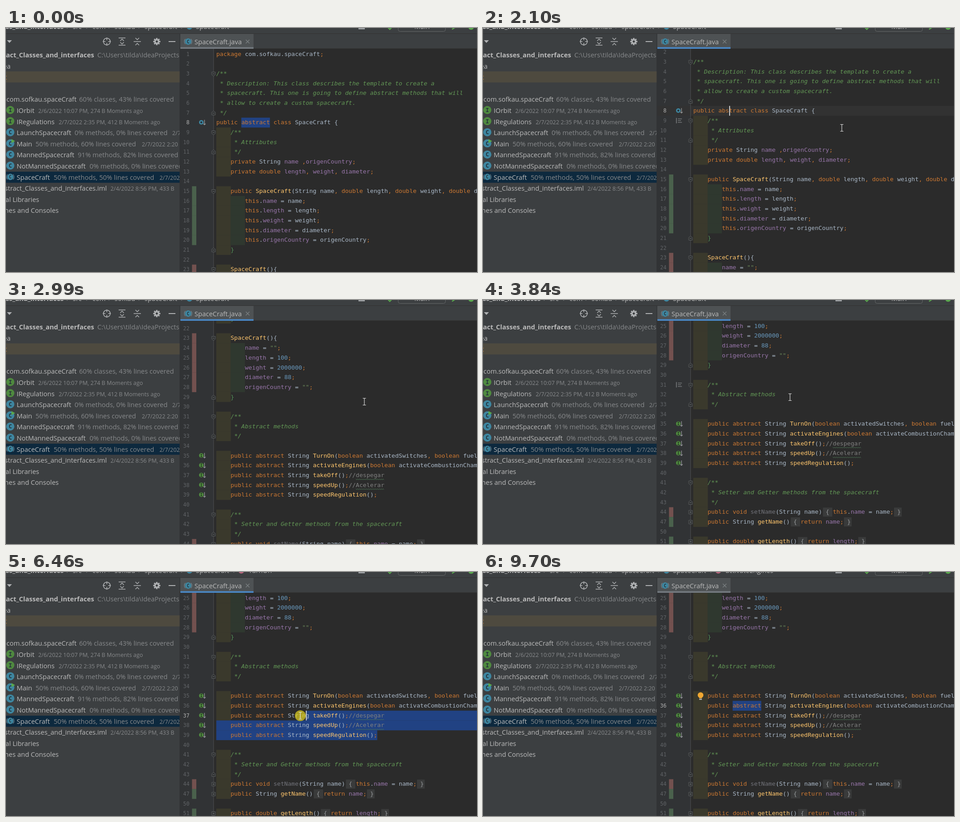
These frames come from a looping animation (1037x540 px, 9760 ms). An HTML page with a canvas:

```html
<!DOCTYPE html>
<html lang="en">
<head>
<meta charset="utf-8">
<title>SpaceCraft.java</title>
<style>
html, body { margin: 0; width: 100%; height: 100%; overflow: hidden; background: #2b2b2b; }
canvas { display: block; width: 1037px; height: 540px; }
</style>
</head>
<body>
<canvas id="stage"></canvas>
<script>
const W = 1037, H = 540, LOOP = 9760;
const CW = 7.875, LH = 21.68, X0 = 463, Y0 = 57.5, TOP = 46;
const MONO = '"DejaVu Sans Mono", monospace';
const SANS = '"Open Sans", "Noto Sans", sans-serif';
const TEXT = '#bbbbbb', DIM = '#87898b', CODE = '#a9b7c6', KEY = '#cc7832', SELECTED = '#214283';

const canvas = document.getElementById('stage');
const dpr = window.devicePixelRatio || 1;
canvas.width = Math.round(W * dpr);
canvas.height = Math.round(H * dpr);
const g = canvas.getContext('2d');
g.scale(dpr, dpr);

const source = `package com.sofkau.spaceCraft;

/**
 * Description: This class describes the template to create a
 * spacecraft. This one is going to define abstract methods that will
 * allow to create a custom spacecraft.
 */
public abstract class SpaceCraft {
    /**
     * Attributes
     */
    private String name ,origenCountry;
    private double length, weight, diameter;

    public SpaceCraft(String name, double length, double weight, double diameter) {
        this.name = name;
        this.length = length;
        this.weight = weight;
        this.diameter = diameter;
        this.origenCountry = origenCountry;
    }

    SpaceCraft(){
        name = "";
        length = 100;
        weight = 2000000;
        diameter = 88;
        origenCountry = "";
    }

    /**
     * Abstract methods
     */

    public abstract String TurnOn(boolean activatedSwitches, boolean fuelTank);
    public abstract String activateEngines(boolean activateCombustionChamber);
    public abstract String takeOff();//despegar
    public abstract String speedUp();//Acelerar
    public abstract String speedRegulation();

    /**
     * Setter and Getter methods from the spacecraft
     */
    public void setName(String name) { this.name = name; }
    public String getName() { return name; }

    public double getLength() { return length; }`;

const TOKEN = /\/\/.*|"[^"]*"|\d+|\w+|[;,]|[^\s\w;,"]+?/g;
const KEYWORD = /^(package|public|abstract|class|private|double|boolean|void|this|return)$/;
const FIELD = /^(name|length|weight|diameter|origenCountry)$/;

function tokenColor(word, before, after, folded) {
  if (word.startsWith('//')) return '#808080';
  if (word[0] === '"') return '#6a8759';
  if (/^\d/.test(word)) return '#6897bb';
  if (/[;,]/.test(word) || KEYWORD.test(word)) return KEY;
  if (FIELD.test(word) && /(this\.|return |private .*|^ +)$/.test(before)) return '#9876aa';
  if (word === 'setName') return '#72737a';
  if (/\w/.test(word) && after[0] === '(') return '#ffc66d';
  if (word === '}' && !before.trim()) return '#549159';
  if (folded && /[{}]/.test(word)) return '#96999b';
  return CODE;
}

const lines = source.split('\n').map((text, i) => {
  const no = i < 44 ? i + 1 : [47, 50, 51][i - 44];
  const doc = /^\s*(\/\*\*|\*)/.test(text);
  const folded = text.includes(' { ');
  const tokens = doc
    ? [{ s: text.trimStart(), col: text.search(/\S/), color: '#629755' }]
    : [...text.matchAll(TOKEN)].map(m => ({
        s: m[0], col: m.index,
        color: tokenColor(m[0], text.slice(0, m.index), text.slice(m.index + m[0].length), folded)
      }));
  let fold = '';
  if (folded) fold = 'plus';
  else if (/\/\*\*$|\).*\{$/.test(text)) fold = 'open';
  else if (/^\s*(\*\/|\})$/.test(text)) fold = 'close';
  const cover = (no > 14 && no < 21) || no === 47 || no === 51 ? '#4a614c'
    : (no > 22 && no < 29) || no === 44 ? '#73514f' : '';
  return { no, text, doc, folded, tokens, fold, cover, indent: text.search(/\S/) };
});

// Motion: [time, value...]
const scrollKeys = [[0, 0], [2030, 0], [2100, 26], [2160, 26], [2230, 80], [2300, 155], [2370, 225],
  [2440, 260], [2600, 260], [2640, 273], [2700, 273], [2840, 375], [3000, 455], [3200, 520.3]];
const mouseKeys = [[70, 760, 505], [250, 700, 400], [640, 541, 212], [800, 541, 212], [1000, 600, 226],
  [1340, 600, 226], [1950, 790, 221], [2300, 790, 221], [2640, 789, 225], [3100, 789, 225],
  [3560, 600, 218], [3700, 674, 218], [3840, 676, 215], [3920, 676, 215], [4300, 612, 221],
  [4710, 640, 216], [4840, 640, 216], [5300, 612, 226], [5780, 800, 370], [5980, 821, 366],
  [6180, 821, 366], [6400, 690, 322], [6460, 648, 318], [6520, 648, 318], [7000, 520, 288],
  [7290, 484, 274], [7510, 484, 274], [7780, 584, 272], [7980, 584, 272], [8360, 598, 298],
  [8810, 598, 298], [9400, 972, 534], [9480, 990, 570]];
const presses = [[680, 820], [6180, 7300], [7800, 7960], [8380, 8460], [8530, 8620]];

function at(keys, t) {
  const i = keys.findIndex(k => k[0] > t);
  if (i < 0) return keys[keys.length - 1].slice(1);
  if (i === 0) return keys[0].slice(1);
  const a = keys[i - 1], b = keys[i], p = (t - a[0]) / (b[0] - a[0]);
  return a.slice(1).map((v, j) => v + (b[j + 1] - v) * p);
}
const within = (t, a, b) => t >= a && t < b;

function rect(x, y, w, h, color) { g.fillStyle = color; g.fillRect(x, y, w, h); }
function text(s, x, y, color, font, align = 'left') {
  g.font = font; g.fillStyle = color; g.textAlign = align; g.fillText(s, x, Math.round(y));
}
function circle(x, y, r, color) {
  g.fillStyle = color; g.beginPath(); g.arc(x, y, r, 0, 7); g.fill();
}
function path(points, color, width = 1, fill = false) {
  g.beginPath();
  points.forEach(([x, y], i) => i ? g.lineTo(x, y) : g.moveTo(x, y));
  if (fill) { g.closePath(); g.fillStyle = color; g.fill(); }
  else { g.strokeStyle = color; g.lineWidth = width; g.stroke(); }
}
function clip(x, y, w, h, draw) {
  g.save(); g.beginPath(); g.rect(x, y, w, h); g.clip(); draw(); g.restore();
}
const sans = (size = 14.55, weight = '') => `${weight} ${size}px ${SANS}`;

function badge(x, y, letter, r = 9) {
  circle(x, y, r, letter === 'I' ? '#4f8a3f' : '#3e86a0');
  text(letter, x, y + r * 0.5, '#25323a', `bold ${r * 1.4}px ${MONO}`, 'center');
}
function abstractBadge(x, y) {
  badge(x, y, 'C', 7);
  for (const side of [0, Math.PI]) {
    g.beginPath();
    g.arc(x, y, 8.4, side - 0.75, side + 0.75);
    g.strokeStyle = '#73858f'; g.lineWidth = 1.2; g.stroke();
  }
}

const NORMAL = sans(), SMALL = sans(12.45);
const tree = [
  { end: 194, name: 'Abstract_Classes_and_interfaces', font: sans(14.55, 'bold'), more: [201, 'C:\\Users\\tilda\\IdeaProjects'] },
  { end: 10, name: '.idea' },
  { end: 2, name: 'out', color: '#c9803a' },
  null,
  { x: 1, name: 'com.sofkau.spaceCraft', more: [161, '60% classes, 43% lines covered'] },
  { icon: 'I', name: 'IOrbit', date: [71, '2/6/2022 10:07 PM, 274 B Moments ago'] },
  { icon: 'I', name: 'IRegulations', date: [116, '2/7/2022 2:35 PM, 412 B Moments ago'] },
  { icon: 'C', name: 'LaunchSpacecraft', more: [151, '0% methods, 0% lines covered'], date: [366, '2/7/2022'] },
  { icon: 'C', name: 'Main', run: true, more: [65, '50% methods, 60% lines covered'], date: [299, '2/7/2022 2:20 PM'] },
  { icon: 'C', name: 'MannedSpacecraft', more: [158, '91% methods, 82% lines covered'] },
  { icon: 'C', name: 'NotMannedSpacecraft', more: [184, '0% methods, 0% lines covered'] },
  { icon: 'A', name: 'SpaceCraft', more: [105, '50% methods, 50% lines covered'], date: [338, '2/7/2022'] },
  { end: 222, name: 'Abstract_Classes_and_interfaces.iml', date: [230, '2/4/2022 8:56 PM, 433 B'] },
  { end: 73, name: 'External Libraries' },
  { end: 116, name: 'Scratches and Consoles' }
];

function drawTree() {
  rect(0, 0, 383, H, '#3c3f41');
  rect(0, 96, 383, 24.5, '#4e4a3f');
  rect(0, 318, 383, 24.5, '#0d293e');
  tree.forEach((row, i) => {
    if (!row) return;
    const y = 60 + 24.6 * i, base = y + 5;
    if (row.icon === 'A') abstractBadge(9.5, y - 1);
    else if (row.icon) badge(9.5, y - 1.5, row.icon);
    if (row.run) path([[12, y - 11], [20, y - 6.5], [12, y - 2]], '#59a84d', 1, true);
    const x = row.end || row.x || 23.5;
    text(row.name, x, base, row.color || TEXT, row.font || NORMAL, row.end ? 'right' : 'left');
    if (row.more) text(row.more[1], row.more[0], base, DIM, NORMAL);
    if (row.date) text(row.date[1], row.date[0], base, DIM, SMALL);
  });
  drawTools();
}

function drawTools() {
  const c = '#afb1b3', y = 30;
  path([[2, 27], [13, 27], [7.5, 33]], c, 1, true);
  g.strokeStyle = c; g.lineWidth = 1.5;
  g.beginPath(); g.arc(222, y, 7.6, 0, 7); g.stroke();
  for (const [dx, dy] of [[1, 0], [-1, 0], [0, 1], [0, -1]])
    path([[222 + dx * 3, y + dy * 3], [222 + dx * 9, y + dy * 9]], c, 1.6);
  path([[248, 22], [263, 22]], c, 1.6);
  path([[248, 38], [263, 38]], c, 1.6);
  path([[251.5, 28.5], [255.5, 24.5], [259.5, 28.5]], c, 1.5);
  path([[251.5, 31.5], [255.5, 35.5], [259.5, 31.5]], c, 1.5);
  path([[281, 30], [297, 30]], c, 1.6);
  path([[285, 22], [289, 26], [293, 22]], c, 1.5);
  path([[285, 38], [289, 34], [293, 38]], c, 1.5);
  for (let k = 0; k < 8; k++) {
    const a = k * Math.PI / 4, dx = Math.cos(a), dy = Math.sin(a);
    path([[332 + dx * 4, y + dy * 4], [332 + dx * 8, y + dy * 8]], c, 3.2);
  }
  circle(332, y, 5.8, c);
  circle(332, y, 2.4, '#3c3f41');
  rect(358, 29, 15, 2, c);
}

function drawHeader(t, focused) {
  rect(0, 0, W, 13, '#3c3f41');
  rect(0, 12, W, 1, '#323232');
  const base = 2;
  text('Abstract_Classes_and_interfaces', 127, base, TEXT, sans(14.55, 'bold'), 'right');
  [['src', 147], ['com', 190], ['sofkau', 239], ['spaceCraft', 305], ['SpaceCraft', 418]]
    .forEach(([s, x]) => text(s, x, base, TEXT, NORMAL));
  for (const x of [136, 179, 228, 294, 388]) path([[x - 2, 1], [x + 2, -3]], '#8a8d8f', 1.2);
  circle(404, -3, 6.5, '#3e86a0');
  const method = t < 6200 ? '' : t < 8900 ? 'TurnOn' : 'activateEngines';
  if (method) {
    path([[501, 1], [505, -3]], '#8a8d8f', 1.2);
    circle(518, -3, 6.5, '#b5677d');
    text(method, 534, base, TEXT, NORMAL);
  }
  rect(776, 0, 14, 3, '#9a9da0');
  path([[841, -1], [845, 3], [849, -1]], '#59a84d', 2.4);
  g.strokeStyle = '#646768'; g.lineWidth = 1;
  g.beginPath(); g.roundRect(863.5, -15, 104, 22.5, 4); g.stroke();
  text('Main', 899, base, TEXT, NORMAL);
  path([[982, 3], [990, -2]], '#59a84d', 2.4);
  circle(1024, -2, 6, '#59a84d');

  rect(383, 13, W - 383, 33, '#3c3f41');
  rect(383, 45, W - 383, 1, '#323232');
  rect(384, 13, 161, 33, '#4e5254');
  rect(384, 42.5, 161, 3.5, focused ? '#4a88c7' : '#747a80');
  abstractBadge(401, 30);
  text('SpaceCraft.java', 415, 36, TEXT, NORMAL);
  path([[528, 26], [536, 34]], '#7c8082', 1.2);
  path([[536, 26], [528, 34]], '#7c8082', 1.2);
}

function foldMark(kind, y) {
  const x = 457, s = 4;
  const shape = kind === 'open' ? [[-s, -s], [s, -s], [s, 2], [0, s + 1], [-s, 2], [-s, -s]]
    : kind === 'close' ? [[-s, s], [s, s], [s, -2], [0, -s - 1], [-s, -2], [-s, s]]
    : [[-s, -s], [s, -s], [s, s], [-s, s], [-s, -s]];
  const points = shape.map(([a, b]) => [x + a, y + b]);
  path(points, '#2e3031', 1, true);
  path(points, '#5a5d5f');
  path([[x - 2, y], [x + 2, y]], '#6c6f71');
  if (kind === 'plus') path([[x, y - 2], [x, y + 2]], '#6c6f71');
}

function overrideMark(y, green) {
  const x = 430, c = green ? '#4f8a3f' : '#3e86a0';
  circle(x, y - 0.5, 5, c);
  if (green) text('I', x, y + 3, '#22301f', `bold 8.5px ${MONO}`, 'center');
  else circle(x, y - 0.5, 2.2, '#28333a');
  path([[437, y - 6], [437, y + 5]], '#a0a3a5', 1.2);
  path([[434.5, y + 2.5], [437, y + 5], [439.5, y + 2.5]], '#a0a3a5', 1.2);
}

function authorMark(y) {
  rect(425, y - 6, 1.5, 12, '#7c7f81');
  [-4.5, -0.7, 3.2].forEach((dy, i) => rect(429, y + dy, i === 1 ? 7 : 9, 1.3, '#7c7f81'));
}

// Caret and selection as zero-based row and column
function editState(t, mouse) {
  const anchor = { row: 38, col: 45 };
  if (t < 700) return { row: 7, sel: [{ row: 7, col: 7 }, { row: 7, col: 15 }] };
  if (t < 6180) return { row: 7, col: 10 };
  if (t < 7970) {
    const [x, y] = t < 7300 ? mouse : [484, 274];
    const row = Math.max(34, Math.min(38, Math.round((y + 520.3 - Y0) / LH)));
    const col = Math.max(4, Math.round((x + 12 - X0) / CW));
    const head = { row, col: row === 38 ? Math.min(col, 45) : col };
    return { row, col: t > 7780 ? 15 : head.col, sel: [head, anchor], solid: true };
  }
  if (t < 8390) return { row: 34, col: 15 };
  if (t < 8530) return { row: 35, col: 17 };
  return { row: 35, col: t < 9570 ? 19 : undefined, sel: [{ row: 35, col: 11 }, { row: 35, col: 19 }] };
}

function drawSelection([a, b], rowY) {
  for (let r = a.row; r <= b.row; r++) {
    const x = r === a.row ? X0 + a.col * CW : X0;
    const end = r === b.row ? X0 + b.col * CW : W;
    rect(x, rowY(r) - LH / 2, end - x, LH + 0.2, SELECTED);
  }
}

function wave(col, n, y) {
  const points = [];
  for (let x = 0; x <= n * CW; x += 2) points.push([X0 + col * CW + x, y + (x % 4 ? 1.2 : -1.2)]);
  path(points, '#4d7355', 0.9);
}

function drawEditor(t, scroll, edit) {
  const rowY = r => Y0 + r * LH - scroll;
  rect(383, TOP, 74, H, '#313335');
  rect(457, TOP, W, H, '#2b2b2b');
  if (!edit.sel) rect(383, rowY(edit.row) - LH / 2, W, LH, '#323232');
  rect(456.5, TOP, 1, H, '#505254');

  lines.forEach((line, r) => {
    const y = rowY(r) - LH / 2;
    if (line.indent >= 4) rect(X0, y, 4 * CW + 0.5, LH + 0.2, '#3a392c');
    if (line.indent >= 8) rect(X0 + 4 * CW, y, 4 * CW, LH + 0.2, '#2f382f');
  });
  if (edit.sel) drawSelection(edit.sel, rowY);

  lines.forEach((line, r) => {
    const y = rowY(r);
    if (y < 20 || y > H + 20) return;
    const base = y + 4;
    text(line.no, 404, base, r === edit.row ? '#b0b0b0' : '#606366', `11.6px ${MONO}`, 'right');
    if (line.cover) rect(409.5, y - LH / 2, 9.5, LH + 0.2, line.cover);
    if (line.fold) foldMark(line.fold, Math.round(y) + 0.5);
    if (r === 7) overrideMark(y, false);
    if (r >= 34 && r <= 38) overrideMark(y, true);
    if (line.folded) {
      const open = line.text.indexOf(' { ');
      rect(X0 + open * CW + 2, y - 10, 3 * CW - 3, 20, '#3a3b3b');
      rect(X0 + (line.text.length - 2) * CW + 1, y - 10, 2 * CW + 1, 20, '#3a3b3b');
    }
    const font = `${line.doc ? 'italic ' : ''}13.08px ${MONO}`;
    for (const k of line.tokens) {
      text(k.s, X0 + k.col * CW, base, k.color, font);
      if (k.s.startsWith('//')) wave(k.col + 2, k.s.length - 2, y + 9);
    }
  });

  if (within(t, 1100, 2200)) authorMark(rowY(8));
  if (within(t, 3250, 5500)) authorMark(rowY(30));
  if (t > 8950) {
    circle(479, 272.5, 6.3, '#f0a732');
    rect(476, 277, 6, 2.5, '#f0a732');
    rect(476, 280.5, 6, 2.4, '#b4b7b9');
  }
  const blink = edit.solid || (t + 200) % 1000 < 500;
  if (edit.col !== undefined && blink)
    rect(X0 + edit.col * CW + 0.25, rowY(edit.row) - LH / 2, 2, LH, '#d0d0d0');
}

function drawMouse(t, [x, y]) {
  if (t < 70 || t > 9480) return;
  if (presses.some(([a, b]) => within(t, a, b))) circle(x, y, 12, 'rgba(222, 205, 30, 0.72)');
  if (within(t, 7320, 7970)) {
    const arrow = [[0, 0], [0, 16], [3.7, 12.6], [6.3, 18.4], [9, 17.2], [6.4, 11.5], [11.3, 11.3], [0, 0]]
      .map(([a, b]) => [x + a, y + b]);
    path(arrow, '#ffffff', 1, true);
    path(arrow, '#222222', 0.9);
    return;
  }
  const c = '#dcdcdc';
  path([[x, y - 7.5], [x, y + 7.5]], c, 1.2);
  for (const s of [-7.5, 7.5]) path([[x - 3.5, y + s], [x + 3.5, y + s]], c, 1.1);
}

function frame(now) {
  const t = now % LOOP;
  const mouse = at(mouseKeys, t), scroll = at(scrollKeys, t)[0];
  g.clearRect(0, 0, W, H);
  clip(383, TOP, W - 383, H - TOP, () => drawEditor(t, scroll, editState(t, mouse)));
  clip(0, 0, 382.5, H, drawTree);
  rect(382.5, 13, 1, H, '#323436');
  drawHeader(t, within(t, 700, 9570));
  drawMouse(t, mouse);
}

let start;
function tick(now) {
  if (start === undefined) start = now;
  frame(now - start);
  requestAnimationFrame(tick);
}
frame(0);
requestAnimationFrame(tick);
</script>
</body>
</html>
```
